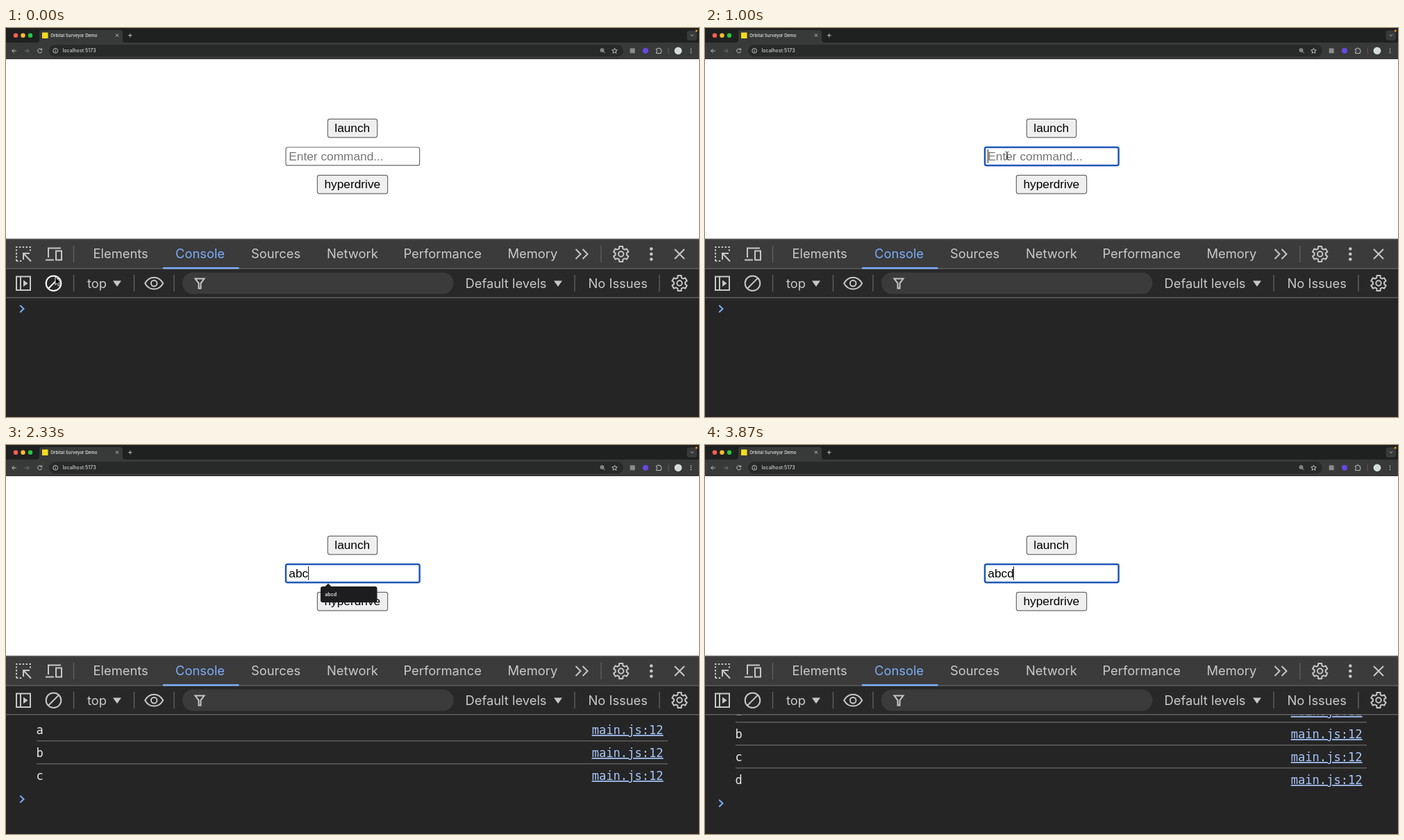
An HTML page that plays this animation: 998x561 px, repeating every 4.4 s.

```html
<!DOCTYPE html>
<html lang="en">
<head>
<meta charset="utf-8">
<title>Console demo</title>
<style>
html, body { margin: 0; width: 100%; height: 100%; overflow: hidden; background: #252525; }
svg { display: block; width: 998px; height: 561px; }
text { white-space: pre; }
.ui { font: 18.35px Inter, sans-serif; fill: #c9c9c9; }
.tiny { font: 500 6.2px Inter, sans-serif; fill: #e8e8e8; }
.page { font: 17.3px "Liberation Sans", Arial, sans-serif; fill: #000; }
.mono { font: 17.1px "DejaVu Sans Mono", monospace; fill: #e8e8e8; }
.icon { fill: none; stroke: #c7c7c7; stroke-width: 2; }
.thin { fill: none; stroke: #d0d0d0; stroke-width: .9; }
.rule { stroke: #5e5e5e; stroke-width: 1.4; }
.btn { fill: #efefef; stroke: #6b6b6b; stroke-width: 1.2; }
</style>
</head>
<body>
<svg viewBox="0 0 998 561">
  <!-- browser frame -->
  <rect width="998" height="45" fill="#1f2020"/>
  <path d="M0 21H44Q48 21 48 17V7Q48 3 52 3H164Q168 3 168 7V17Q168 21 172 21H998V45H0Z" fill="#383939"/>
  <circle cx="14" cy="10.8" r="3.2" fill="#ff5f57"/>
  <circle cx="24.5" cy="10.8" r="3.2" fill="#febc2e"/>
  <circle cx="35" cy="10.8" r="3.2" fill="#28c840"/>
  <rect x="52" y="6.5" width="8.5" height="8.5" fill="#f5dc1e"/>
  <text class="tiny" x="64.3" y="12.6">Orbital Surveyor Demo</text>
  <path class="thin" d="M158 8.5l4 4m0-4l-4 4M176 10.7h5.6M178.8 7.9v5.6"/>
  <rect x="980.5" y="3.5" width="14.5" height="14.5" rx="4" fill="#383939"/>
  <path class="thin" d="M986 9.5l2 2l2-2"/>
  <circle cx="994.3" cy="4" r="1.5" fill="#f09a2c"/>
  <path class="thin" d="M14.8 33H8.7m2.8-2.8L8.7 33l2.8 2.8"/>
  <path class="thin" d="M27 33h6.1m-2.8-2.8L33.1 33l-2.8 2.8" style="stroke:#7c7c7c"/>
  <path class="thin" d="M51.3 31.2A3 3 0 1 0 51.7 33.6M51.7 29.4v2.2h-2.2"/>
  <rect x="62" y="24.3" width="827" height="17" rx="8.5" fill="#282929"/>
  <circle class="thin" cx="71.2" cy="32.8" r="3.4"/>
  <path class="thin" d="M71.2 32.3v2.5M71.2 30.7v.9"/>
  <text class="tiny" x="81.5" y="35.3" style="font-size:7.15px;font-weight:400">localhost:5173</text>
  <circle class="thin" cx="858.5" cy="32" r="2.4"/>
  <path class="thin" d="M860.3 33.8l2.4 2.4M857.3 32h2.4M858.5 30.8v2.4"/>
  <path class="thin" d="M876.5 29.2l1.1 2.5 2.7.2-2.1 1.8.7 2.7-2.4-1.5-2.4 1.5.7-2.7-2.1-1.8 2.7-.2z"/>
  <rect x="898.7" y="29.3" width="7" height="7" fill="#8c8c8c"/>
  <circle cx="921" cy="32.8" r="4.1" fill="#6548dc"/>
  <path class="thin" d="M936.6 30h2.2a1.2 1.2 0 0 1 2.4 0h2v2.2a1.2 1.2 0 0 1 0 2.4v2h-6.6v-2a1.2 1.2 0 0 0 0-2.4z"/>
  <path d="M954 28.5v9" stroke="#666" stroke-width=".8"/>
  <circle cx="968" cy="32.8" r="5.4" fill="#d5dddb"/>
  <g fill="#d0d0d0"><circle cx="986.5" cy="30" r=".8"/><circle cx="986.5" cy="32.8" r=".8"/><circle cx="986.5" cy="35.6" r=".8"/></g>

  <!-- page -->
  <rect y="45" width="998" height="259" fill="#fff"/>
  <rect class="btn" x="463.4" y="131.4" width="71.2" height="26.4" rx="2.8"/>
  <text class="page" x="473.3" y="150.2">launch</text>
  <rect id="field" x="403" y="172" width="192.6" height="26.2" rx="2.5" fill="#fff"/>
  <text class="page" id="value" x="407.3" y="190.7"></text>
  <rect id="caret" y="175" width="1" height="20" fill="#222"/>
  <rect class="btn" x="448.4" y="212.4" width="101.2" height="26.4" rx="2.8"/>
  <text class="page" x="458.5" y="231.2">hyperdrive</text>
  <g id="hint">
    <path d="M456 204H459.5L464 199.8L468.500 204H531.500Q534.500 204 534.500 207V224Q534.500 227 531.500 227H456Q453 227 453 224V207Q453 204 456 204Z" fill="#1d1c1e"/>
    <text class="tiny" x="459.300" y="217.700" style="font-size:7px;font-weight:600">abcd</text>
  </g>

  <!-- console log -->
  <rect y="304" width="998" height="257" fill="#252525"/>
  <g id="log"></g>
  <path id="prompt" d="M20.300 -5l5.200 5l-5.200 5" fill="none" stroke="#7cacf8" stroke-width="2"/>
  <rect id="bar" x="993" y="414" width="4" height="145.500" rx="2" fill="#858585"/>

  <!-- devtools bars -->
  <rect y="304" width="998" height="43" fill="#3b3b3b"/>
  <rect y="347" width="998" height="42" fill="#282828"/>
  <path class="rule" d="M0 304.500H998M0 347H998M0 388.700H998M97.500 314v24M857 314v24M97.500 356v24M184.500 356v24M242 356v24M819 356v24M941 356v24"/>
  <rect x="226" y="345" width="109.500" height="2.500" fill="#7cacf8"/>
  <g id="tabs"></g>
  <path class="icon" d="M15 336V316H35V323M15 336H23" stroke-dasharray="2.400 2.400"/>
  <path class="icon" d="M25 334v-9h9M25.500 325.500l10.500 11" stroke-width="2.300"/>
  <path class="icon" d="M61 331V317.500H79M57 334.500H69M72 321.500h8v13h-8z"/>
  <path class="icon" d="M820.500 319l7 7-7 7M830.500 319l7 7-7 7M963 319l14 14m0-14l-14 14"/>
  <g fill="#c7c7c7"><circle cx="929.300" cy="318.500" r="2.300"/><circle cx="929.300" cy="326" r="2.300"/><circle cx="929.300" cy="333.500" r="2.300"/></g>
  <g class="icon" id="gears"></g>

  <path class="icon" d="M15 358.500h20v19.500h-20zM21 358.500v19.500"/>
  <path d="M25 363.500l6.500 4.700-6.500 4.700z" fill="#c7c7c7"/>
  <path class="icon" id="clear" d="M57.700 368.200a10.800 10.800 0 1 0 21.600 0a10.800 10.800 0 1 0-21.600 0M61 375.800L76 360.600"/>
  <path class="icon" d="M200.200 368.200Q205 359.800 213.200 359.800T226.200 368.200Q221.400 376.600 213.200 376.600T200.200 368.200Z"/>
  <circle class="icon" cx="213.200" cy="368.200" r="4.300"/>
  <path d="M154 364.500h12l-6 8.500zM789 364.500h12l-6 8.500z" fill="#c7c7c7"/>
  <rect x="254" y="352.500" width="390.500" height="31" rx="15.500" fill="#3b3b3b"/>
  <path class="icon" d="M272.500 361.500h13l-5 6.700v7.300h-3v-7.300z" stroke-width="1.800"/>

  <!-- pointers -->
  <path id="arrow" d="M0 0V11.500L2.700 9L4.500 13L6.400 12.200L4.700 8.300H8.300Z" fill="#000" stroke="#fff" stroke-width=".9"/>
  <path id="beam" d="M-2.500 -5.500Q0 -5.500 0 -4V4Q0 5.500 -2.500 5.500M2.500 -5.500Q0 -5.500 0 -4V4Q0 5.500 2.500 5.500M-1.300 1.500H1.300" fill="none" stroke="#333" stroke-width=".9"/>
</svg>
<script>
const $ = id => document.getElementById(id);
const LOOP = 4400, TICKS = 66;
const keyTicks = [21, 27, 35, 43], letters = 'abcd';

// Toolbar labels: text, x, baseline
$('tabs').innerHTML = [
  ['Elements', 125.500, 332.300], ['Console', 244, 332.300], ['Sources', 353, 332.300],
  ['Network', 462, 332.300], ['Performance', 572.500, 332.300], ['Memory', 722.500, 332.300],
  ['top', 117, 374.800], ['Filter', 297, 374.800], ['Default levels', 661.500, 374.800], ['No Issues', 838.500, 374.800]
].map(([s, x, y]) =>
  `<text class="ui" x="${x}" y="${y}"${s === 'Console' ? ' style="fill:#7cacf8"' : ''}>${s}</text>`).join('');

function gear(cx, cy) {
  const pts = [];
  for (let k = 0; k < 6; k++)
    for (const [a, r] of [[-20, 8.2], [-13, 11.2], [13, 11.2], [20, 8.2]]) {
      const q = (k * 60 - 90 + a) * Math.PI / 180;
      pts.push((cx + r * Math.cos(q)).toFixed(1) + ',' + (cy + r * Math.sin(q)).toFixed(1));
    }
  return `<polygon points="${pts.join(' ')}" stroke-linejoin="round"/><circle cx="${cx}" cy="${cy}" r="3.700"/>`;
}
$('gears').innerHTML = gear(885.7, 326) + gear(970, 368);

$('log').innerHTML = [...letters].map((c, i) => {
  const y = 417 + 33 * i;
  return `<g>${i ? `<path class="rule" d="M44 ${y - 23.3 + 33 - 33}H953"/>` : ''}
    <text class="mono" x="43.500" y="${y}">${c}</text>
    <text class="mono" x="843.700" y="${y}" style="fill:#a8c7fa;text-decoration:underline">main.js:12</text></g>`;
}).join('');
const rows = [...$('log').children];

const show = (el, on) => el.style.display = on ? '' : 'none';
const ease = p => { p = Math.min(1, Math.max(0, p)); return p * p * (3 - 2 * p); };
const place = (el, x, y) => el.setAttribute('transform', `translate(${x} ${y})`);

function draw(time) {
  const n = Math.floor((time % LOOP) / LOOP * TICKS + .1) % TICKS;
  const count = keyTicks.filter(k => n >= k).length;
  const focus = n >= 14;

  // Field
  const value = $('value');
  value.textContent = count ? letters.slice(0, count) : 'Enter command...';
  value.style.fill = count ? '#000' : '#757575';
  $('field').setAttribute('stroke', focus ? '#2058b8' : n >= 11 ? '#333' : '#6b6b6b');
  $('field').setAttribute('stroke-width', focus ? 2.5 : 1.2);
  $('caret').setAttribute('x', Math.floor(407.5 + (count ? value.getComputedTextLength() : 0)));
  show($('caret'), focus && (n < 51 || n >= 58));
  show($('hint'), n >= 22 && n < 43);

  // Console
  const scroll = count === 4 ? -27 : 0;
  rows.forEach((row, i) => show(row, i < count));
  place($('log'), 0, scroll);
  place($('prompt'), 0, count ? 411.7 + 33 * count + scroll : 405);
  $('bar').style.opacity = n < 43 ? 0 : Math.min(1, Math.max(0, (54 - n) / 4));
  $('clear').style.stroke = n ? '#c7c7c7' : '#fff';

  // Pointer: console button, short rest, then the field
  const a = ease(n / 7), b = ease((n - 8) / 4);
  const x = 71 + 316 * a + 48 * b, y = 359 - 128 * a - 47 * b;
  const inside = x > 403 && y < 198;
  show($('arrow'), !inside);
  show($('beam'), inside && !count);
  place($('arrow'), x, y);
  place($('beam'), x, y);
}

const start = performance.now();
function frame() {
  draw(performance.now() - start);
  requestAnimationFrame(frame);
}
frame();
</script>
</body>
</html>
```
